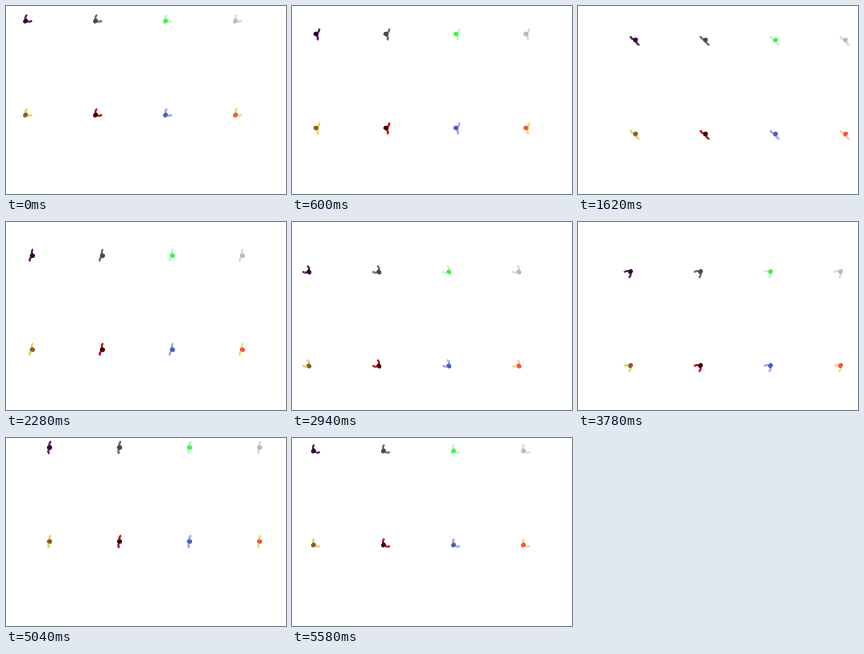
An HTML page for the animation above (5640 ms loop, 280 by 188 pixels).

```html
<!DOCTYPE html>
<html lang="en">
<head>
<meta charset="utf-8">
<title>Eight flyers</title>
<style>
html, body { margin: 0; width: 100%; height: 100%; overflow: hidden; background: #fff; }
svg { display: block; }
</style>
</head>
<body>
<svg id="stage" width="280" height="188" viewBox="0 0 280 188">
  <defs>
    <g id="flyer">
      <path class="wing" fill="none" stroke="var(--wing)" stroke-width="2" />
      <path class="wing" fill="none" stroke="var(--wing)" stroke-width="2" />
      <ellipse id="body" rx="2.6" ry="2.2" fill="var(--body)" />
    </g>
  </defs>
</svg>
<script>
const LOOP = 5640, STEP = 60, FLAPS = 6;
const CELL = { w: 70, h: 94, columns: 4 };

// [body, wing]
const palettes = [
  ['#2b0a30', '#5c1c62'], ['#484848', '#6c6c6c'], ['#46f050', '#b4fcb8'], ['#bababa', '#d8d8d8'],
  ['#8c5a28', '#dcd852'], ['#3c0404', '#c80a14'], ['#4c5cc0', '#98a4f4'], ['#f4543c', '#f6d67c']
];

// [time in ms, x, y] along the closed flight path
const route = [
  [0, 19.5, 15], [300, 12.5, 22], [600, 24, 28], [900, 39, 26], [1200, 53, 21],
  [1410, 61, 26], [1620, 57.5, 34], [1800, 49, 39], [2100, 35, 36.5], [2400, 21, 33],
  [2640, 11.5, 40], [2940, 17, 50], [3300, 31, 56], [3600, 44, 55], [3780, 52.5, 49.5],
  [4200, 63, 36], [4500, 63.5, 24], [4800, 54, 13], [5040, 43.5, 9.5], [5400, 29, 9.5],
  [5580, 21.5, 13]
];

const NS = 'http://www.w3.org/2000/svg';
const stage = document.getElementById('stage');
const wings = [...document.querySelectorAll('.wing')];
const body = document.getElementById('body');

palettes.forEach(([bodyColor, wingColor], i) => {
  const copy = document.createElementNS(NS, 'use');
  copy.setAttribute('href', '#flyer');
  copy.setAttribute('x', i % CELL.columns * CELL.w);
  copy.setAttribute('y', Math.floor(i / CELL.columns) * CELL.h);
  copy.style.setProperty('--body', bodyColor);
  copy.style.setProperty('--wing', wingColor);
  stage.append(copy);
});

function knot(i) {
  const n = route.length, lap = Math.floor(i / n);
  const [t, x, y] = route[i - lap * n];
  return [t + lap * LOOP, x, y];
}

// Smooth closed curve with time-aware tangents
function position(time) {
  const t = (time % LOOP + LOOP) % LOOP;
  let i = 0;
  while (knot(i + 1)[0] <= t) i++;
  const [a, b, c, d] = [i - 1, i, i + 1, i + 2].map(knot);
  const span = c[0] - b[0], u = (t - b[0]) / span;
  return [1, 2].map(k => {
    const m0 = (c[k] - a[k]) / (c[0] - a[0]) * span;
    const m1 = (d[k] - b[k]) / (d[0] - b[0]) * span;
    return b[k] + u * (m0 + u * (3 * (c[k] - b[k]) - 2 * m0 - m1
      + u * (2 * (b[k] - c[k]) + m0 + m1)));
  });
}

const fixed = v => v.toFixed(2);

function draw(time) {
  const t = Math.floor(time % LOOP / STEP) * STEP;
  const [x, y] = position(t);
  const [x0, y0] = position(t - 90), [x1, y1] = position(t + 90);
  const heading = Math.atan2(y1 - y0, x1 - x0);
  const beat = Math.cos(2 * Math.PI * (FLAPS * t / LOOP - 0.07));
  const spread = (107 + 42 * beat) * Math.PI / 180;
  const at = (r, a) => `${fixed(x + r * Math.cos(heading + a))} ${fixed(y + r * Math.sin(heading + a))}`;

  wings.forEach((wing, i) => {
    const side = i ? -1 : 1;
    wing.setAttribute('d', `M${at(1, side * spread)}Q${at(4.6, side * (spread - 0.5))} ${at(6.4, side * spread)}`);
  });
  body.setAttribute('transform', `translate(${fixed(x)} ${fixed(y)}) rotate(${fixed(heading * 180 / Math.PI)})`);
}

const start = performance.now();
function tick() {
  draw(performance.now() - start);
  requestAnimationFrame(tick);
}
draw(0);
requestAnimationFrame(tick);
</script>
</body>
</html>
```
